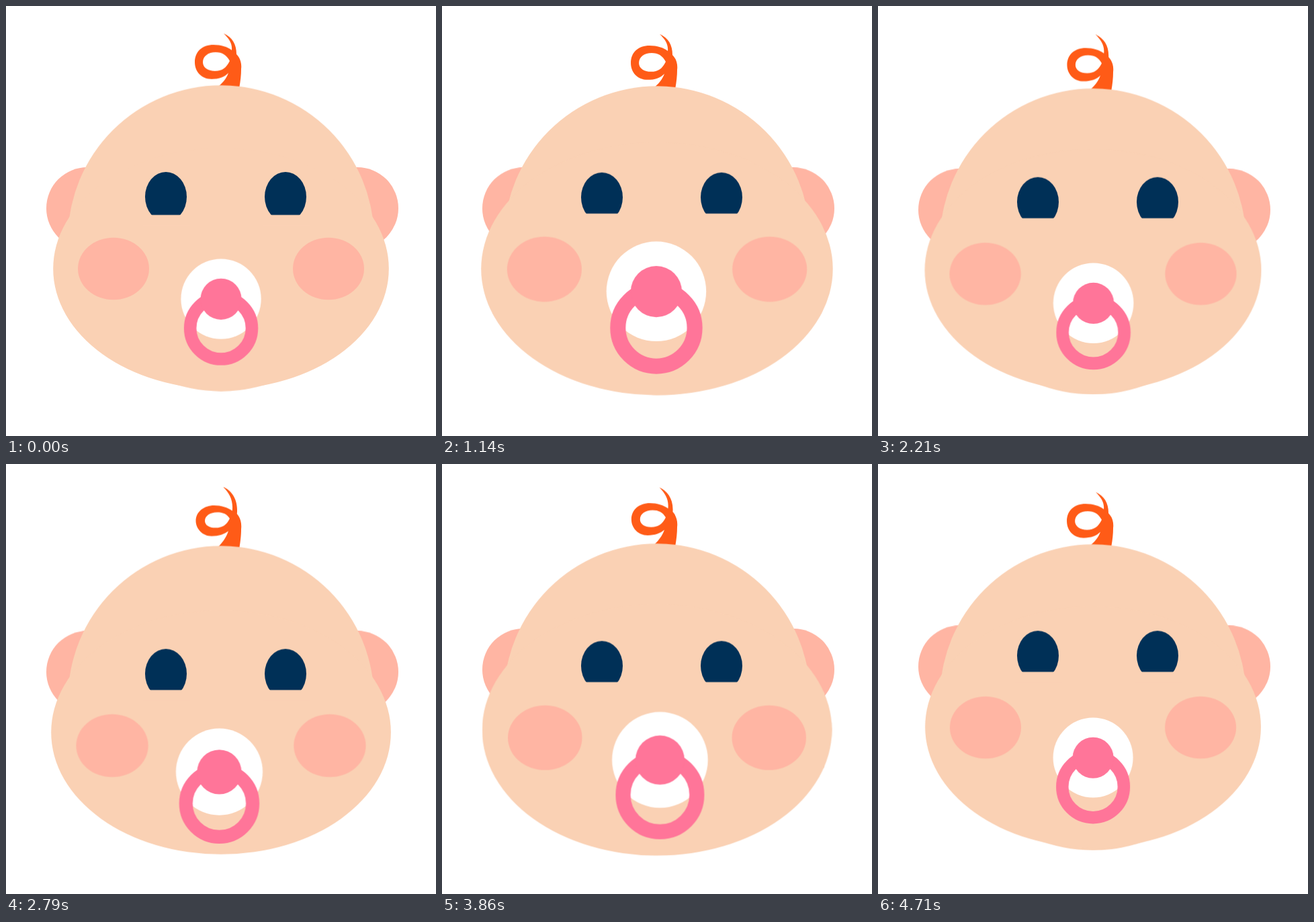
These frames come from a looping animation (640 by 640 pixels, 4.78 s). An HTML page:

```html
<!DOCTYPE html>
<html lang="en">
<head>
<meta charset="utf-8">
<title>Baby with pacifier</title>
<style>
  html, body { margin: 0; width: 100%; height: 100%; overflow: hidden; background: #fff; }
  svg { display: block; width: 100vw; height: 100vh; }

  :root {
    --cycle: 2390ms;
    --beat: 1195ms;
    --sine: cubic-bezier(.364, 0, .636, 1);
  }

  .skin { fill: #fad1b4; }
  .blush { fill: #ffb5a3; }
  .eye { fill: #003057; }
  .hair { fill: #ff5b17; fill-rule: evenodd; }
  .pink { fill: #ff7599; }
  .ring { fill: none; stroke: #ff7599; stroke-width: 18.5; }

  .bob, .skull, .hair, .puff, .sway, .suck {
    animation: var(--sine) infinite;
  }
  .bob { --drop: 11px; animation-name: bob; animation-duration: var(--beat); }
  .face { --drop: 37.3px; }
  .skull { animation-name: skull; animation-duration: var(--beat); animation-delay: -1070ms; }
  .hair { animation-name: hair; animation-duration: var(--beat); }
  .puff { animation-name: puff; animation-duration: var(--cycle); transform-origin: 320px 391px; }
  .sway { animation-name: sway; animation-duration: var(--cycle); }
  .suck { animation-name: suck; animation-duration: var(--cycle); animation-delay: -75ms; transform-origin: 320px 436px; }
  .lids { animation: lids 4780ms linear infinite; }

  @keyframes bob { 50% { transform: translateY(var(--drop)); } }
  @keyframes skull {
    0%, 100% { transform: translateY(-1.5px); }
    50% { transform: translateY(10.1px); }
  }
  @keyframes puff { 50% { transform: scale(1.048); } }
  @keyframes suck { 50% { transform: scale(1.248); } }
  @keyframes sway {
    33.333% { transform: translate(-5px, -12px); }
    66.667% { transform: translate(5px, -12px); }
  }
  @keyframes lids {
    0% { transform: translateY(2.8px); }
    3%, 100% { transform: none; }
  }
  @keyframes hair {
    0%, 100% {
      d: path("M324 41C337 47 343 57 343 72C349 78 351 86 350 94C350 103 349 112 347 123L312 123C323 115 328 108 331 100C325 106 317 109 306 109C291 109 281 98 281 84C281 68 292 58 309 58C320 58 330 61 336 66C337 56 332 49 324 41ZM333 82C328 73 322 69 312 69C301 69 293 75 293 84C293 92 301 97 311 97C322 97 328 92 333 82Z");
    }
    50% {
      d: path("M323 27C334 31 347 46 344 70C349 76 351 84 350 93C350 102 349 111 347 123L312 123C322 114 328 104 331 95C325 99 317 102 306 102C293 102 283 91 283 80C283 67 296 58 310 58C320 58 330 61 337 66C339 49 333 37 323 27ZM333 76C329 70 323 68 315 68C305 68 297 73 297 80C297 86 303 89.5 312 89.5C322 89.5 328 86 333 76Z");
    }
  }
</style>
</head>
<body>
<svg viewBox="0 0 640 640">
  <g class="bob blush">
    <circle cx="121" cy="301" r="61"/>
    <circle cx="523" cy="301" r="61"/>
  </g>

  <g class="skull">
    <path class="hair" d="M324 41C337 47 343 57 343 72C349 78 351 86 350 94C350 103 349 112 347 123L312 123C323 115 328 108 331 100C325 106 317 109 306 109C291 109 281 98 281 84C281 68 292 58 309 58C320 58 330 61 336 66C337 56 332 49 324 41ZM333 82C328 73 322 69 312 69C301 69 293 75 293 84C293 92 301 97 311 97C322 97 328 92 333 82Z"/>
    <circle class="skin" cx="320" cy="346" r="227.7"/>
  </g>

  <g class="bob">
    <ellipse class="skin puff" cx="320" cy="391" rx="249.8" ry="179.5"/>
  </g>

  <g class="bob face">
    <g class="puff blush">
      <ellipse cx="160" cy="391" rx="53" ry="46.2"/>
      <ellipse cx="480" cy="391" rx="53" ry="46.2"/>
    </g>
    <g class="eye">
      <ellipse cx="238" cy="284" rx="31" ry="37"/>
      <ellipse cx="416" cy="284" rx="31" ry="37"/>
    </g>
    <g class="lids skin">
      <rect x="204" y="308.2" width="70" height="16"/>
      <rect x="382" y="308.2" width="70" height="16"/>
    </g>
    <g class="sway">
      <g class="suck">
        <circle cx="320" cy="436" r="59.5" fill="#fff"/>
        <circle class="ring" cx="320" cy="479.4" r="45.8"/>
        <circle class="pink" cx="320" cy="436.2" r="30.5"/>
      </g>
    </g>
  </g>
</svg>
</body>
</html>
```
